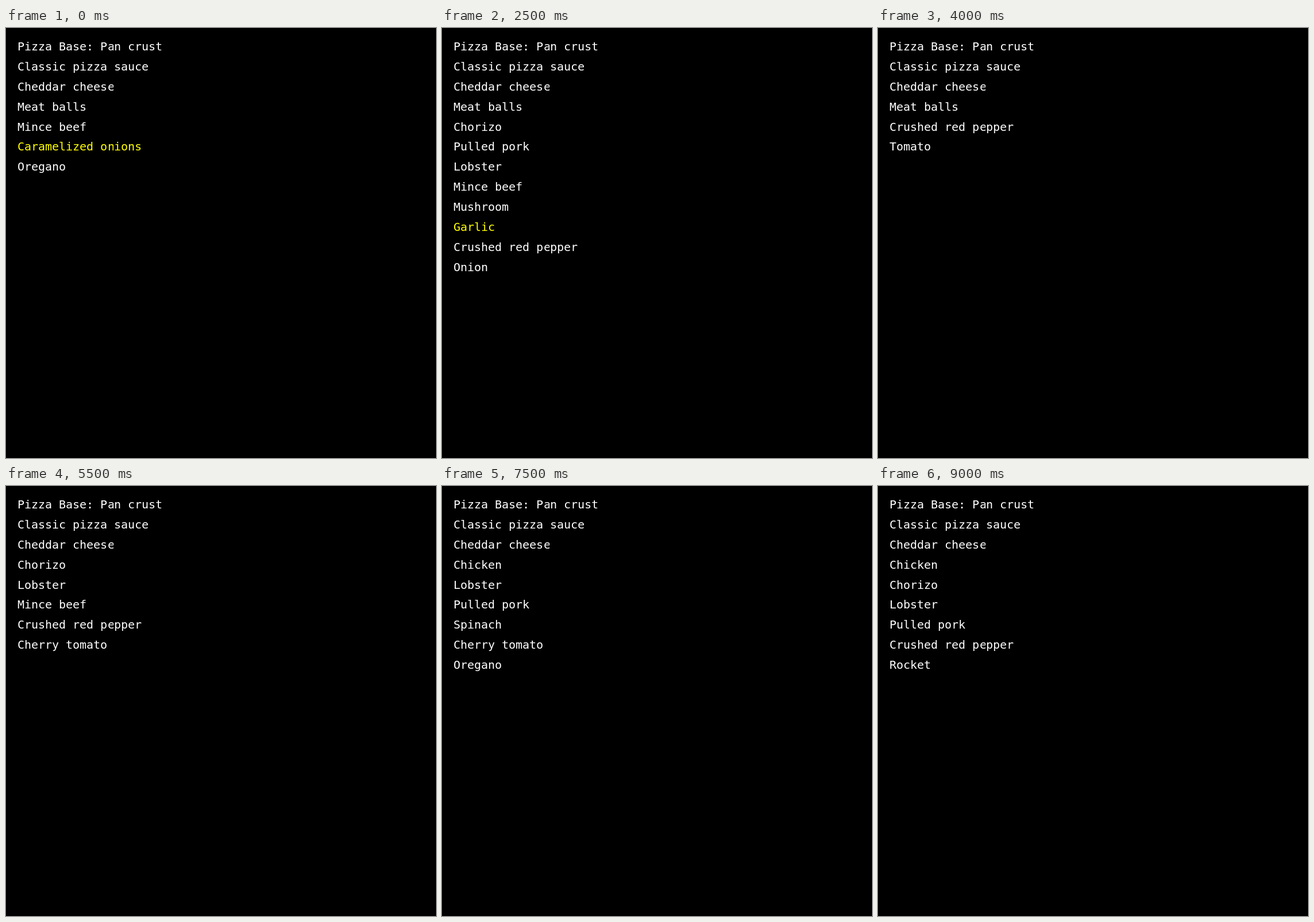
Animation of 748x748 px, one loop 9.5 s. Source, as an HTML page with a canvas:

```html
<!DOCTYPE html>
<html lang="en">
<head>
<meta charset="utf-8">
<title>Pizza toppings</title>
<style>
  html, body { margin: 0; width: 100%; height: 100%; overflow: hidden; background: #000; }
  canvas { display: block; width: 100%; height: 100%; image-rendering: pixelated; }
</style>
</head>
<body>
<canvas id="stage" width="750" height="750"></canvas>
<script>
const STEP = 500;
const FONT_SIZE = 20, ADVANCE = FONT_SIZE * 0.602;
const LEFT = 20, FIRST_BASELINE = 39, LINE_HEIGHT = 35;

const base = ["Pizza Base: Pan crust", "Classic pizza sauce", "Cheddar cheese"];
const highlighted = new Set(["Caramelized onions", "Garlic"]);

// One recipe per step, listed below the shared base.
const recipes = [
  "Meat balls,Mince beef,Caramelized onions,Oregano",
  "Meat balls,Chicken,Mushroom,Onion",
  "Meat balls,Chorizo,Mince beef,Bell peppers,Onion",
  "Meat balls,Chorizo,Pulled pork,Mince beef,Chicken,Cherry tomato,Bell peppers,Oregano,Onion",
  "Meat balls,Chorizo,Pulled pork,Mince beef,Spinach,Bell peppers,Onion",
  "Meat balls,Chorizo,Pulled pork,Lobster,Mince beef,Mushroom,Garlic,Crushed red pepper,Onion",
  "Meat balls,Chorizo,Lobster,Crushed red pepper,Onion",
  "Meat balls,Chicken,Spinach,Oregano",
  "Meat balls,Crushed red pepper,Tomato",
  "Chorizo,Pulled pork,Spinach,Onion",
  "Chorizo,Chicken,Mince beef,Mushroom,Roasted peppers,Rocket",
  "Chorizo,Lobster,Mince beef,Crushed red pepper,Cherry tomato",
  "Chorizo,Mince beef,Spinach,Oregano",
  "Chicken,Chorizo,Lobster,Bell peppers,Onion",
  "Chicken,Lobster,Mince beef,Mushroom,Crushed red pepper,Bell peppers",
  "Chicken,Lobster,Pulled pork,Spinach,Cherry tomato,Oregano",
  "Chicken,Chorizo,Pulled pork,Mince beef,Mushroom,Spinach,Oregano",
  "Chicken,Chorizo,Lobster,Spinach,Onion",
  "Chicken,Chorizo,Lobster,Pulled pork,Crushed red pepper,Rocket"
].map(list => base.concat(list.split(",")));

const canvas = document.getElementById("stage");
const ctx = canvas.getContext("2d");
ctx.font = `${FONT_SIZE}px "DejaVu Sans Mono", monospace`;

// Each glyph sits on a whole pixel of the monospace grid.
function drawLine(text, row) {
  ctx.fillStyle = highlighted.has(text) ? "#ff0" : "#fff";
  [...text].forEach((glyph, column) => {
    ctx.fillText(glyph, LEFT + Math.round(column * ADVANCE), FIRST_BASELINE + row * LINE_HEIGHT);
  });
}

let shown = -1;

function render(time) {
  const step = Math.floor(time / STEP) % recipes.length;
  if (step === shown) return;
  shown = step;
  ctx.fillStyle = "#000";
  ctx.fillRect(0, 0, canvas.width, canvas.height);
  recipes[step].forEach(drawLine);
}

const start = performance.now();
function tick() {
  render(performance.now() - start);
  requestAnimationFrame(tick);
}
tick();
</script>
</body>
</html>
```
